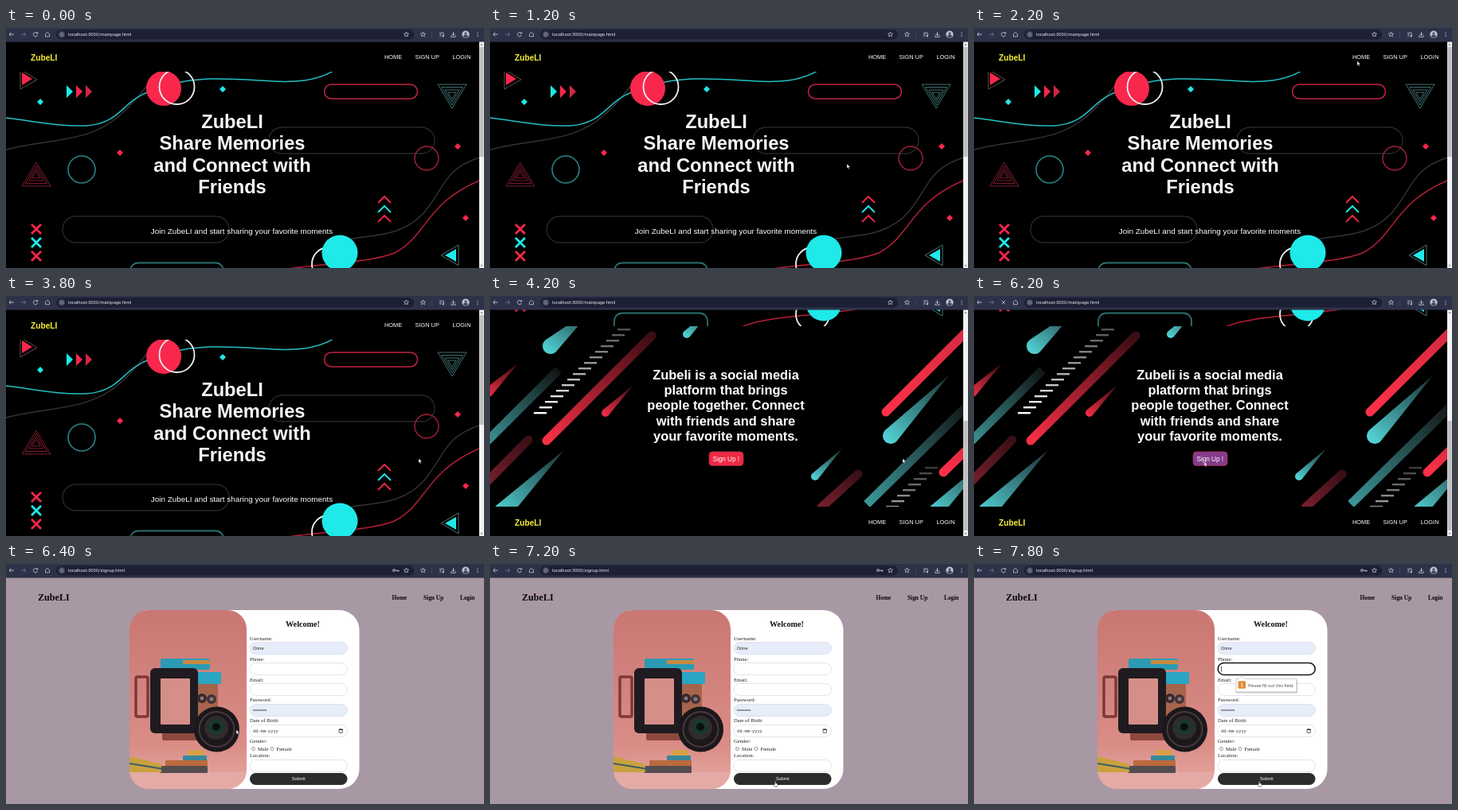
An HTML page for the animation above (8 s loop, 600 by 302 pixels).

```html
<!DOCTYPE html>
<html lang="en">
<head>
<meta charset="utf-8">
<style>
html, body { margin: 0; width: 100%; height: 100%; overflow: hidden; background: #000; }
svg { display: block; width: 600px; height: 302px; }
text { font-family: "Liberation Sans", sans-serif; white-space: pre; }
.serif text { font-family: "Liberation Serif", serif; }
.bold, .bold text { font-weight: bold; }
.line { fill: none; }
.mid { text-anchor: middle; }
</style>
</head>
<body>
<svg id="stage" viewBox="0 0 600 302"></svg>
<script>
const RED = '#f9274c', CYAN = '#1fe9e9', TEAL = '#2a8385', DARK = '#272727';

const text = (x, y, size, fill, words, extra = '') =>
  `<text x="${x}" y="${y}" font-size="${size}" fill="${fill}" ${extra}>${words}</text>`;
const shape = (d, fill, extra = '') => `<path d="${d}" fill="${fill}" ${extra}/>`;
const stroke = (d, color, width = 1.4, extra = '') =>
  `<path class="line" d="${d}" stroke="${color}" stroke-width="${width}" ${extra}/>`;
const disc = (x, y, r, fill) => `<circle cx="${x}" cy="${y}" r="${r}" fill="${fill}"/>`;
const ring = (x, y, r, color, width = 1.4) =>
  `<circle class="line" cx="${x}" cy="${y}" r="${r}" stroke="${color}" stroke-width="${width}"/>`;
const box = (x, y, w, h, rx, fill, extra = '') =>
  `<rect x="${x}" y="${y}" width="${w}" height="${h}" rx="${rx}" fill="${fill}" ${extra}/>`;
const pill = (x, y, w, h, color, width = 1.4) =>
  box(x, y, w, h, h / 2, 'none', `stroke="${color}" stroke-width="${width}"`);
const diamond = (x, y, color) => shape(`M${x - 4} ${y}l4-4 4 4-4 4z`, color);
const each = (list, draw) => list.map(draw).join('');

// Diagonal shapes run from a bright lower-left head to a faded upper-right tail.
function comet(x, y, r, tipX, tipY, fill) {
  const k = r / Math.hypot(tipX - x, tipY - y), px = (tipY - y) * k, py = (x - tipX) * k;
  return shape(`M${x + px} ${y + py}L${tipX} ${tipY}L${x - px} ${y - py}A${r} ${r} 0 0 1 ${x + px} ${y + py}z`, fill);
}
const streak = (x, y, x2, y2, fill, cap = 'round') =>
  stroke(`M${x} ${y}L${x2} ${y2}`, fill, 11, `stroke-linecap="${cap}"`);
const ladder = (x, y, count, opacity, fade) => each([...Array(count).keys()], i =>
  box(x + i * 7, y - i * 7, 16, 2.4, 0, '#fff', `opacity="${opacity - i * fade}"`));

const nestedTriangle = (x, y, dir, color) => each([1, .75, .5, .28], s =>
  stroke(`M${x - 18 * s} ${y + 14 * s * dir}h${36 * s}l${-18 * s} ${-30 * s * dir}z`, color, 1));
const fade = (id, from, to) => `<linearGradient id="${id}" x1="0" y1="1" x2="1" y2="0">
  <stop stop-color="${from}"/><stop offset="1" stop-color="${to}"/></linearGradient>`;

const defs = `<defs>
  ${fade('red', '#ff3048', '#d42a40')}${fade('dimRed', '#f92f46', '#3a0d14')}${fade('maroon', '#77202c', '#3a0f16')}
  ${fade('cyan', '#55dde0', '#1c2e30')}${fade('teal', '#3c9799', '#121414')}
  <linearGradient id="photo" x2="0" y2="1"><stop stop-color="#c97772"/>
    <stop offset=".75" stop-color="#da8c86"/><stop offset="1" stop-color="#e7aaa4"/></linearGradient>
  <clipPath id="heroClip"><rect y="55" width="594" height="257"/></clipPath>
  <clipPath id="bandClip"><rect y="312" width="594" height="227"/></clipPath>
  <clipPath id="photoClip"><rect x="155" y="58" width="147" height="225" rx="24"/></clipPath>
</defs>`;

const siteNav = y => text(31, y + 2, 10.2, '#f6f03a', 'ZubeLI', 'class="bold"') +
  text(475, y, 7.4, '#fff', 'HOME') + text(513.5, y, 7.4, '#fff', 'SIGN UP') + text(560.5, y, 7.4, '#fff', 'LOGIN');

const hero = `<g clip-path="url(#heroClip)">
  ${stroke('M18 52L39 65 18 77z', '#6b4a50', 1)}${shape('M20 56l13 8-13 8z', RED)}
  ${diamond(43, 93, CYAN)}
  ${each([[76, CYAN], [88, RED], [100, '#d02744']], ([x, c]) => shape(`M${x} 72l8 8-8 8z`, c))}
  ${stroke('M0 153C60 138 105 145 145 108S175 62 205 52', '#333')}
  ${stroke('M0 113C40 118 65 124 100 123C145 120 145 92 180 80C225 60 270 63 320 66C365 70 390 66 411 54', '#25bfc3', 1.5)}
  ${disc(198, 76, 22, RED)}${ring(214.5, 74, 22, '#eee', 1.8)}
  ${diamond(272, 77, CYAN)}
  ${pill(399.5, 71, 117, 18, '#c02340', 1.5)}
  ${nestedTriangle(560, 85, -1, '#40706f')}
  ${pill(330, 125, 208, 33, DARK)}${pill(71, 237, 209, 33, DARK)}
  ${ring(528, 164, 15, '#a82038')}${diamond(567, 149, RED)}${diamond(143, 157, RED)}
  ${ring(95, 178, 17, TEAL, 1.6)}
  ${nestedTriangle(38, 185, 1, '#7b1c2e')}
  ${each([[253, RED], [270, CYAN], [287, RED]], ([y, c]) =>
    stroke(`M32 ${y - 6}l12 12m0-12l-12 12`, c, 2.8))}
  ${each([[212, RED], [224, CYAN], [236, RED]], ([y, c]) => stroke(`M467 ${y + 8}l8-8 8 8`, c, 1.8))}
  ${stroke('M405 282C425 250 485 277 525 232C553 197 550 178 594 163', '#333')}
  ${stroke('M316 313C350 296 445 300 488 283C530 260 525 222 594 192', '#b82038', 1.5)}
  ${diamond(577, 239, RED)}
  ${ring(405, 297, 21, '#eee', 1.8)}${disc(419, 283, 22.5, CYAN)}
  ${stroke('M546 286l22-13v26z', '#4a7575', 1)}${shape('M551 286l14-8v16z', CYAN)}
  ${box(156, 295.5, 117, 30, 10, 'none', 'stroke="#2b7072" stroke-width="1.8"')}
  </g>
  <g class="mid bold">${each(['ZubeLI', 'Share Memories', 'and Connect with', 'Friends'], (s, i) =>
    text(284, 126 + i * 27.4, 23.7, '#f8f8f8', s))}</g>
  ${text(296, 259, 9.9, '#fff', 'Join ZubeLI and start sharing your favorite moments', 'class="mid"')}`;

const band = `<g clip-path="url(#bandClip)"><g transform="translate(0 274)">
  ${comet(76, 63, 10, 130, 15, 'url(#cyan)')}
  ${comet(247, 48, 5, 280, 15, 'url(#cyan)')}
  ${ladder(55, 146, 16, 1, .045)}
  ${streak(71, 182, 203, 50, 'url(#dimRed)')}
  ${comet(145, 147, 5, 180, 112, 'url(#dimRed)')}
  ${streak(-8, 187, 86, 93, 'url(#teal)', 'butt')}
  ${comet(-2, 121, 6, 35, 85, 'url(#dimRed)')}
  ${streak(-6, 236, 48, 181, 'url(#maroon)')}
  ${comet(16, 271, 11, 93, 194, 'url(#cyan)')}
  ${streak(497, 146, 602, 41, 'url(#red)')}
  ${comet(503, 176, 10, 576, 100, 'url(#cyan)')}
  ${streak(473, 262, 600, 137, 'url(#teal)', 'butt')}
  ${comet(408, 227, 5, 442, 192, 'url(#cyan)')}
  ${streak(416, 266, 462, 224, 'url(#maroon)')}
  ${ladder(497, 264, 8, .65, .06)}
  ${streak(569, 222, 605, 187, 'url(#red)')}
  ${comet(560, 270, 9, 626, 204, 'url(#cyan)')}
  </g></g>
  <g class="mid bold">${each(['Zubeli is a social media', 'platform that brings', 'people together. Connect',
    'with friends and share', 'your favorite moments.'], (s, i) => text(296, 379 + i * 19.2, 16.45, '#fff', s))}</g>
  <rect id="button" x="275" y="470" width="43" height="17.5" rx="4" stroke="#a83048" stroke-width=".8"/>
  ${text(296.3, 481.5, 8.2, '#fff', 'Sign Up !', 'class="mid"')}`;

const camera = `<g clip-path="url(#photoClip)">
  ${box(155, 58, 147, 225, 0, 'url(#photo)')}
  ${shape('M155 262h147v21h-147z', '#e5aaa5')}
  ${box(163, 142, 15, 50, 2, 'none', 'stroke="#7d3838" stroke-width="3.5"')}
  ${box(194, 119, 62, 14, 2, '#2b9ab3')}${box(222, 121, 34, 5, 0, '#c58a43')}
  ${box(238, 136, 32, 15, 2, '#2ba5c4')}${box(240, 151, 26, 40, 2, '#a6644c')}
  ${box(196, 211, 54, 11, 2, '#8e493c')}
  ${box(228, 234, 21, 8, 2, '#d6a04a')}${box(222, 241, 30, 8, 1, '#37889a')}
  ${box(200, 247, 53, 7, 1, '#bb6a3d')}${box(193, 254, 60, 9, 1, '#554c50')}
  ${shape('M155 242l40 10v10h-40z', '#c9a13f')}${stroke('M155 251l43 7', '#395e62', 2)}
  ${box(181, 131, 60, 82, 6, '#201b20')}${box(194, 144, 37, 58, 1, '#d58e88')}
  ${disc(246, 169, 6, '#35282b')}${disc(258, 170, 6, '#423237')}
  ${disc(246, 169, 2.5, '#8b7779')}${disc(258, 170, 2.5, '#8b7779')}
  ${disc(264.5, 208, 28.5, '#1b171b')}${ring(264.5, 208, 22, '#47393d', 2)}
  ${disc(264, 206, 15, '#312b2c')}${disc(264, 205, 10, '#19382f')}${disc(264, 205, 5, '#0b100e')}
  </g>`;

const fields = [98.5, 124.5, 150.5, 176.5, 202.5, 246.5];
const filled = [98.5, 176.5];
const labels = [['Username:', 95.5], ['Phone:', 121.5], ['Email:', 147.5], ['Password:', 173.3],
  ['Date of Birth:', 199.2], ['Gender:', 225.2], ['Location:', 243.4]];
const signup = `${box(0, 17, 600, 285, 0, '#a898a4')}
  <g class="serif bold">${text(40, 46, 12.1, '#0b080b', 'ZubeLI')}
  ${text(484.5, 45, 7.4, '#0b080b', 'Home')}${text(524, 45, 7.4, '#0b080b', 'Sign Up')}${text(570, 45, 7.4, '#0b080b', 'Login')}</g>
  ${box(155, 58, 288.5, 225, 25, '#fff')}${camera}
  <g class="serif">${text(372.5, 78.5, 10.2, '#111', 'Welcome!', 'class="mid bold"')}
  ${each(labels, ([s, y]) => text(306, y, 6.6, '#222', s))}
  ${text(316, 234.7, 6.6, '#222', 'Male')}${text(339.5, 234.7, 6.6, '#222', 'Female')}</g>
  ${each(fields, y => box(306, y, 122.5, 15, 7.5, filled.includes(y) ? '#e6edf9' : '#fff',
    'stroke="#d3d8e8" stroke-width=".7"'))}
  ${text(310, 108, 5.5, '#222', 'Orine')}
  ${each([...Array(9).keys()], i => disc(310.8 + i * 1.95, 184, .75, '#222'))}
  ${text(310, 212, 5.3, '#333', 'dd-mm-yyyy', 'style="font-family:\'Liberation Mono\',monospace"')}
  ${box(418, 208, 4.4, 4.4, .5, 'none', 'stroke="#222" stroke-width=".7"')}${stroke('M418 208.3h4.4', '#222', 1.2)}
  ${ring(310.5, 232.5, 2, '#555', .6)}${ring(334, 232.5, 2, '#555', .6)}
  ${box(306, 263, 122.5, 15, 7.5, '#2d2c2d')}${text(367.3, 272.2, 5.4, '#fff', 'Submit', 'class="mid"')}
  <g id="warning">
    ${box(306.2, 124.5, 122, 15, 7.5, '#fff', 'stroke="#171717" stroke-width="1.6"')}${stroke('M310.5 128.5v7', '#111', .7)}
    ${box(329, 145.5, 77, 17, 1.5, '#0003')}
    ${shape('M329 144.5h4l3.5-4 3.5 4h65v16.5h-76z', '#fff', 'stroke="#aaa" stroke-width=".6"')}
    ${box(331.5, 147.3, 9.5, 9.5, 1, '#e08f3c')}${text(336.3, 155, 8, '#fff', '!', 'class="mid bold"')}
    ${text(344, 154.7, 5.4, '#444', 'Please fill out this field.', 'style="font-family:\'Open Sans\',sans-serif"')}
  </g>`;

const star = x => stroke(`M${x} 5l.9 2 2.1.2-1.6 1.4.5 2.1-1.9-1.1-1.9 1.1.5-2.1-1.6-1.4 2.1-.2z`, '#d5d7df', .7);
const toolbar = `${box(0, 0, 600, 17.5, 0, '#2e3249')}${box(63, 2, 449, 12.5, 6.2, '#1d2034')}
  ${stroke('M10 8h-6m2.5-2.5l-2.5 2.5 2.5 2.5', '#d5d7df', .8)}
  ${stroke('M19 8h6m-2.5-2.5l2.5 2.5-2.5 2.5', '#777b8c', .8)}
  <g id="reload">${stroke('M39.3 6.8a2.6 2.6 0 1 0 .2 2.2M39.7 5v2h-2', '#d5d7df', .8)}</g>
  <g id="stop">${stroke('M34.8 5.8l4.4 4.4m0-4.4l-4.4 4.4', '#d5d7df', .8)}</g>
  ${stroke('M49.5 7.5l2.5-2.2 2.5 2.2v3.2h-5z', '#d5d7df', .7)}
  ${disc(70, 8.2, 4.6, '#34384d')}${ring(70, 8.2, 2.2, '#d5d7df', .6)}${stroke('M70 7.8v1.6M70 6.7v.5', '#d5d7df', .6)}
  ${text(78, 10.2, 5.8, '#e3e5ec', '', 'id="address" style="font-family:Roboto,sans-serif"')}
  <g id="key">${ring(487, 8, 1.5, '#d5d7df', .8)}${stroke('M488.5 8h4.5v1.5m-1.6-1.5v1.5', '#d5d7df', .8)}</g>
  ${star(502.5)}${star(523.5)}${stroke('M534.5 5v7', '#4a4e62', .6)}
  ${stroke('M544 6h5M544 8h3.5M544 10h2.5M549.5 6v4.3', '#d5d7df', .7)}${disc(548.7, 10.3, 1, '#d5d7df')}
  ${stroke('M561.5 5v4.2m-2-1.8l2 2 2-2M558.8 9.5v1.7h5.4v-1.7', '#d5d7df', .8)}
  ${disc(577, 8, 4.6, '#b7cbd3')}${disc(577, 6.7, 1.5, '#454b58')}${shape('M574 11a3 2.8 0 0 1 6 0l-3 1.4z', '#454b58')}
  ${each([5.8, 8, 10.2], y => disc(592, y, .6, '#d5d7df'))}`;

const stage = document.getElementById('stage');
stage.innerHTML = `${defs}
  <g id="home">${box(0, 0, 600, 302, 0, '#000')}
    <g id="content">${siteNav(39)}${hero}${band}${siteNav(560.5)}</g>
    ${box(594, 17, 6, 285, 0, '#f2f2f5')}<rect id="thumb" x="594.4" y="24" width="5.2" height="138" fill="#bfbfbf"/>
    ${shape('M595.4 21.7l1.6-2 1.6 2zM595.4 298.3l1.6 2 1.6-2z', '#777')}
  </g>
  <g id="signup">${signup}</g>${toolbar}
  <g id="arrow">${shape('M0-1.5v5.6l1.3-1.2.9 2 .9-.4-.9-1.9h1.8z', '#fff', 'stroke="#222" stroke-width=".4"')}</g>
  <g id="hand">${shape('M-.6-2.5q.6-.8 1.2 0v2.2l2.2.7q.6 2.4-.6 3.9h-2.6q-1.2-1.2-2-3l.6-.4 1.2 1z', '#fff', 'stroke="#222" stroke-width=".5"')}</g>`;

const el = id => document.getElementById(id);
const show = (id, on) => el(id).setAttribute('display', on ? 'inline' : 'none');
const move = (id, x, y) => el(id).setAttribute('transform', `translate(${x} ${y})`);

const pointerPath = [[200, 415, 302], [2200, 481, 43], [2600, 527, 38], [3000, 571, 38], [3700, 518, 206],
  [4800, 518, 206], [5800, 289, 210], [6400, 289, 210], [7200, 358, 276]];
function pointerAt(t) {
  const i = pointerPath.findIndex(p => p[0] > t);
  if (i <= 0) return pointerPath[i < 0 ? pointerPath.length - 1 : 0].slice(1);
  const [a, b] = [pointerPath[i - 1], pointerPath[i]];
  const u = (t - a[0]) / (b[0] - a[0]), ease = u * u * (3 - 2 * u);
  return [a[1] + (b[1] - a[1]) * ease, a[2] + (b[2] - a[2]) * ease];
}

function render(now) {
  const t = Math.floor(now % 8000 / 200) * 200;
  const onSignup = t >= 6400, overSubmit = t >= 7200;
  const scroll = Math.min(1, Math.max(0, (t - 3800) / 400));
  const [x, y] = pointerAt(t);

  show('home', !onSignup);
  show('signup', onSignup);
  show('key', onSignup);
  show('stop', t === 6200);
  show('reload', t !== 6200);
  show('warning', t >= 7400);
  show('arrow', t >= 200 && !overSubmit);
  show('hand', overSubmit);
  move('content', 0, -274 * scroll);
  move('thumb', 0, 133 * scroll);
  move('arrow', x, y);
  move('hand', x, y);
  el('button').setAttribute('fill', t >= 5800 ? '#853b8c' : '#ee2944');
  el('address').textContent = `localhost:3000/${onSignup ? 'signup' : 'mainpage'}.html`;
  requestAnimationFrame(render);
}
requestAnimationFrame(render);
</script>
</body>
</html>
```
